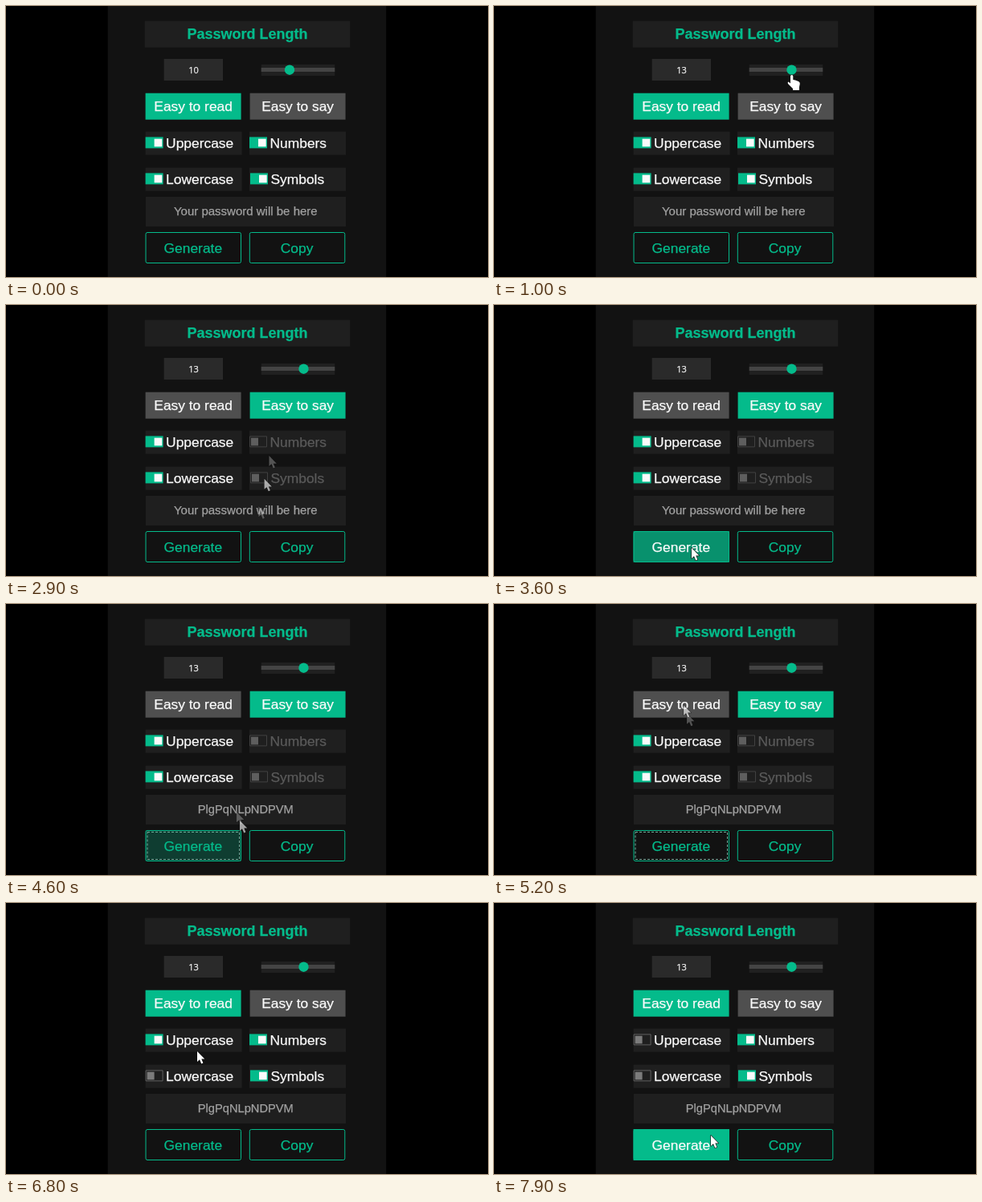
These frames come from a looping animation (600 px wide and 338 px high, 8 s). An HTML page with a canvas:

```html
<!DOCTYPE html>
<html lang="en">
<head>
<meta charset="utf-8">
<title>Password generator</title>
<style>
  html, body { margin: 0; width: 100%; height: 100%; overflow: hidden; background: #000; }
  canvas { display: block; }
</style>
</head>
<body>
<canvas id="stage" width="600" height="338"></canvas>
<script>
const ctx = document.getElementById('stage').getContext('2d');
const LOOP = 8000, STEP = 100;
const GREEN = '#04bb8b', BOX = '#1f1f1f', WHITE = '#fafafa';
const SANS = '"Liberation Sans", Arial, sans-serif';

// Moments when the user acts
const SHOW = 200, GRAB = 500, DROP = 1000, SAY = 1600, GENERATE = 3700,
      READ = 5300, LOWER = 6500, UPPER = 7000;

// Pointer stops: time and place, eased in between
const stops = [
  { t: SHOW, x: 408, y: 150 },
  { t: GRAB, x: 354, y: 86 },
  { t: DROP, x: 371, y: 86 },
  { t: SAY, x: 365, y: 126 },
  { t: 2300, x: 362, y: 205 },
  { t: 2700, x: 330, y: 176 },
  { t: 3200, x: 306, y: 292 },
  { t: 3600, x: 246, y: 303 },
  { t: 4000, x: 246, y: 303 },
  { t: 4600, x: 291, y: 270 },
  { t: 5200, x: 236, y: 126 },
  { t: 5800, x: 341, y: 190 },
  { t: LOWER, x: 232, y: 213 },
  { t: 6800, x: 238, y: 185 },
  { t: 7100, x: 236, y: 172 },
  { t: 7600, x: 270, y: 290 }
];

const mix = (a, b, k) => a + (b - a) * k;
const clamp = v => Math.max(0, Math.min(1, v));
const ease = k => k * k * (3 - 2 * k);

function pointer(t) {
  const next = stops.findIndex(s => s.t >= t);
  if (next < 1) return stops.at(next);
  const a = stops[next - 1], b = stops[next];
  const k = ease((t - a.t) / (b.t - a.t));
  return { x: mix(a.x, b.x, k), y: mix(a.y, b.y, k) };
}

function rect(x, y, w, h, fill) {
  ctx.fillStyle = fill;
  ctx.fillRect(x, y, w, h);
}

function frame(x, y, w, h, color, radius = 0) {
  ctx.strokeStyle = color;
  ctx.lineWidth = 1;
  ctx.beginPath();
  ctx.roundRect(x + .5, y + .5, w - 1, h - 1, radius);
  ctx.stroke();
}

function text(str, x, y, color, font = '17.4px ' + SANS, align = 'center') {
  ctx.font = font;
  ctx.textAlign = align;
  ctx.fillStyle = ctx.strokeStyle = color;
  ctx.lineWidth = .25;
  ctx.fillText(str, x, y);
  ctx.strokeText(str, x, y);
}

function modeButton(label, x, active) {
  rect(x, 108.7, 119, 33, active ? GREEN : '#4f4f4f');
  text(label, x + 59.5, 131.3, WHITE);
}

function option(label, x, y, state, shift = 0) {
  const left = x + shift, on = state === 'on', disabled = state === 'disabled';
  rect(x, y, 120, 29, BOX);
  if (on) {
    rect(left, y + 6.7, 22, 14, GREEN);
    rect(left + 11, y + 9, 9.7, 9.7, WHITE);
  } else {
    frame(left, y + 6.7, 22, 14, disabled ? '#414141' : '#606060');
    rect(left + 2, y + 9, 9, 9.7, disabled ? '#5e5e5e' : '#7b7b7b');
  }
  text(label, left + 25.5, y + 20.2, disabled ? '#5a5a5a' : WHITE, undefined, 'left');
}

// Hover fades over a few steps, so average the recent past
function hoverLevel(t, x) {
  const past = [0, 1, 2, 3].map(n => t - n * STEP);
  const inside = past.filter(time => {
    const p = pointer(time);
    return time >= SHOW && p.x >= x && p.x < x + 119 && p.y >= 282 && p.y < 321;
  });
  return inside.length / past.length;
}

function actionButton(label, x, hover, focus) {
  ctx.globalAlpha = hover;
  rect(x, 282, 119.5, 39, GREEN);
  ctx.globalAlpha = 1;
  frame(x, 282, 119.5, 39, GREEN, 2);
  if (focus) {
    ctx.setLineDash([3, 2]);
    frame(x + 2, 284, 115.5, 35, '#6fae9c');
    ctx.setLineDash([]);
  }
  text(label, x + 59.3, 307.7, hover > .5 ? WHITE : GREEN);
}

const arrow = new Path2D('M0 0V13L3 10.3L5.2 15.5L7.4 14.5L5.3 9.6H9.3Z');
const hand = new Path2D('M-2 1.5Q-2 0 -.3 0Q1.3 0 1.3 1.5V6L4 6.5L8 8Q10 8.8 9.8 11L9 15V19H1V17L-5 11Q-6 9 -4.5 8.5L-2 10.5Z');

function drawPointer(p, shape, alpha = 1) {
  ctx.save();
  ctx.translate(p.x, p.y);
  ctx.globalAlpha = alpha;
  ctx.lineWidth = 1.2;
  ctx.lineJoin = 'round';
  ctx.strokeStyle = '#111';
  ctx.stroke(shape);
  ctx.fillStyle = '#fff';
  ctx.fill(shape);
  ctx.restore();
}

function cursor(t) {
  if (t < SHOW) return;
  const now = pointer(t);
  if (t >= GRAB - STEP && t <= DROP + STEP) return drawPointer(now, hand);
  // Fast moves leave faint neighbours
  const ghosts = [pointer(t - STEP), pointer(t + STEP)]
    .filter(p => Math.hypot(p.x - now.x, p.y - now.y) > 10);
  ghosts.forEach(p => drawPointer(p, arrow, .28));
  drawPointer(now, arrow, ghosts.length ? .62 : 1);
}

function draw(t) {
  const say = t >= SAY && t < READ;
  const drag = ease(clamp((t - GRAB) / (DROP - GRAB)));

  rect(0, 0, 600, 338, '#000');
  rect(126.7, 0, 346.5, 338, '#121212');

  rect(172.7, 18.7, 255.6, 33, BOX);
  text('Password Length', 300.5, 41.3, GREEN, 'bold 18px ' + SANS);

  rect(196.6, 66, 73.4, 27, '#2a2a2a');
  text(10 + Math.round(3 * drag), 233.5, 83.5, '#f0f0f0', '11px "Open Sans", sans-serif');

  rect(317.7, 73, 91.6, 14, '#202020');
  rect(317.7, 77, 91.6, 5, '#444');
  ctx.fillStyle = GREEN;
  ctx.beginPath();
  ctx.arc(mix(353, 370.5, drag), 79.7, 6.2, 0, 7);
  ctx.fill();

  modeButton('Easy to read', 173.6, !say);
  modeButton('Easy to say', 303.6, say);

  const extra = say ? 'disabled' : 'on';
  option('Uppercase', 173.6, 156.7, t < UPPER ? 'on' : 'off');
  option('Numbers', 303, 156.7, extra);
  option('Lowercase', 173.6, 201.7, t < LOWER ? 'on' : 'off');
  option('Symbols', 303, 201.7, extra, 1);

  rect(174, 238, 249, 37, BOX);
  if (t < GENERATE) text('Your password will be here', 298.3, 261, '#a2a2a2', '15px ' + SANS);
  else text('PlgPqNLpNDPVM', 298.3, 261, '#a2a2a2', '14.67px ' + SANS);

  actionButton('Generate', 173.5, hoverLevel(t, 174), t >= GENERATE && t < READ);
  actionButton('Copy', 302.8, hoverLevel(t, 303), false);

  cursor(t);
}

function tick() {
  draw(Math.floor(performance.now() % LOOP / STEP) * STEP);
  requestAnimationFrame(tick);
}
tick();
</script>
</body>
</html>
```
